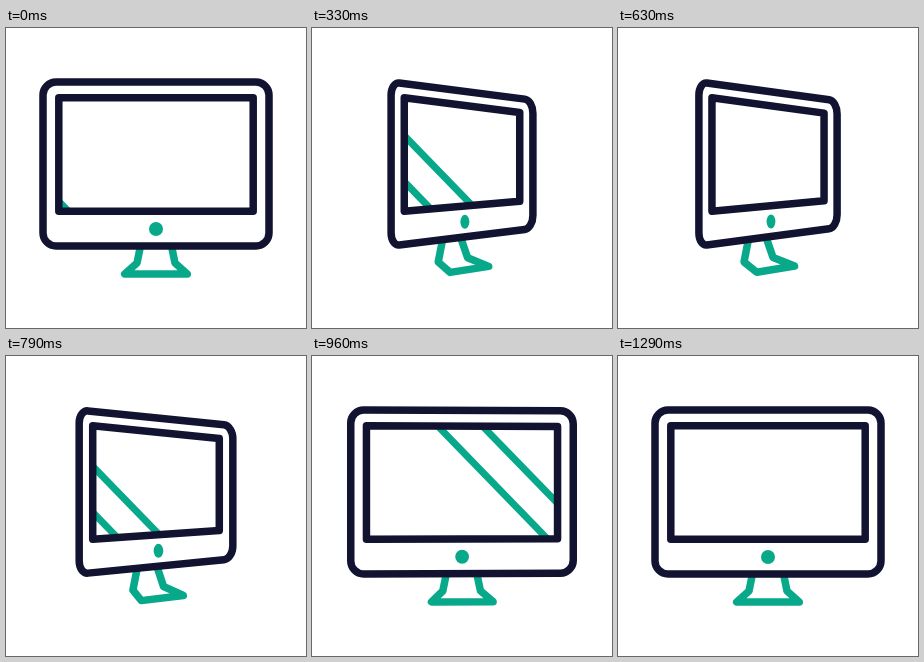
Recreate the animation shown at these times as an HTML page. Size 300x300 px, loop 1370 ms.

```html
<!DOCTYPE html>
<html lang="en">
<head>
<meta charset="utf-8">
<title>Monitor</title>
<style>
  html, body { margin: 0; width: 100%; height: 100%; overflow: hidden; background: #fff; }
  svg { display: block; width: 100%; height: 100%; }
  .line { fill: none; stroke-width: 7.5; stroke-linejoin: round; }
  .dark { stroke: #121331; }
  .green { stroke: #08a88a; }
  #body { fill: #fff; }
  #dot { fill: #08a88a; }
</style>
</head>
<body>
<svg viewBox="0 0 300 300">
  <clipPath id="clip"><path id="hole"/></clipPath>
  <path id="stand" class="line green"/>
  <path id="body" class="line dark"/>
  <g clip-path="url(#clip)">
    <path id="shine" class="line green" style="stroke-width:7"/>
  </g>
  <path id="screen" class="line dark"/>
  <ellipse id="dot"/>
</svg>
<script>
const LOOP = 1370, FPS = 24, LAST = 31;
const CENTER = 150, HORIZON = 137.3, DEPTH = .228;
const SLOPE = 1.03, GAP = 46;
const el = id => document.getElementById(id);
const mix = (a, b, p) => a + (b - a) * p;
const mixPoint = (a, b, p) => [mix(a[0], b[0], p), mix(a[1], b[1], p)];
const poly = pts => "M" + pts.map(pt => pt.join(" ")).join("L");

function bezier(x1, y1, x2, y2) {
  const at = (a, b, s) => 3 * a * s * (1 - s) ** 2 + 3 * b * s * s * (1 - s) + s ** 3;
  return x => {
    if (x <= 0) return 0;
    if (x >= 1) return 1;
    let lo = 0, hi = 1;
    for (let i = 0; i < 24; i++) {
      const mid = (lo + hi) / 2;
      if (at(x1, x2, mid) < x) lo = mid; else hi = mid;
    }
    return at(y1, y2, lo);
  };
}

const easeTurn = bezier(.25, .15, .25, 1);
const easeBack = bezier(.88, 0, .15, 1);
const easeShine = bezier(.3, .22, .6, 1);

// A rectangle narrowing as it turns, its right side receding to the horizon
function panel(half, top, bottom, squeeze, p) {
  const w = half * (1 - squeeze * p);
  const far = y => mix(y, HORIZON, DEPTH * p);
  return [[CENTER - w, top], [CENTER + w, far(top)],
          [CENTER + w, far(bottom)], [CENTER - w, bottom]];
}

function rounded(pts, rx, ry) {
  const toward = (a, b, d) => mixPoint(a, b, d / Math.hypot(b[0] - a[0], b[1] - a[1]));
  return pts.map((c, i) => {
    const prev = pts[(i + 3) % 4], next = pts[(i + 1) % 4];
    const [rIn, rOut] = i % 2 ? [rx, ry] : [ry, rx];
    const curve = [toward(c, prev, rIn * .45), toward(c, next, rOut * .45), toward(c, next, rOut)];
    return (i ? "L" : "M") + toward(c, prev, rIn).join(" ") + "C" + curve.join(" ");
  }).join("") + "Z";
}

const standFront = [[134.5, 218], [131, 235], [118.7, 246], [181.3, 246], [169, 235], [165.5, 218]];
const standTurned = [[130.5, 211], [126, 234], [139, 244.3], [176.5, 238], [155, 229.5], [147.5, 208]];

function stripes(t) {
  const low = mix(165, -186, easeShine(t / 650));
  return [low, low - GAP].map(c => `M0 ${c}L300 ${c + 300 * SLOPE}`).join("");
}

function draw(t) {
  const p = t < 580 ? easeTurn(t / 400) : 1 - easeBack((t - 580) / 500);
  const screen = poly(panel(97.2, 69.8, 183.2, .425, p)) + "Z";
  el("body").setAttribute("d", rounded(panel(113, 54, 218, .39, p), mix(13, 8, p), 13));
  el("screen").setAttribute("d", screen);
  el("hole").setAttribute("d", screen);
  el("stand").setAttribute("d", poly(standFront.map((pt, i) => mixPoint(pt, standTurned[i], p))));
  el("shine").setAttribute("d", stripes(t - (t < 630 ? 119 : 630)));
  const dot = { cx: mix(150, 153, p), cy: mix(201, 193.5, p), rx: mix(7, 4.4, p), ry: 7 };
  for (const key in dot) el("dot").setAttribute(key, dot[key]);
}

function tick() {
  const t = performance.now() % LOOP;
  const step = Math.min(LAST, Math.floor((t + 2) * FPS / 1000));
  draw(step * 1000 / FPS);
  requestAnimationFrame(tick);
}
tick();
</script>
</body>
</html>
```
